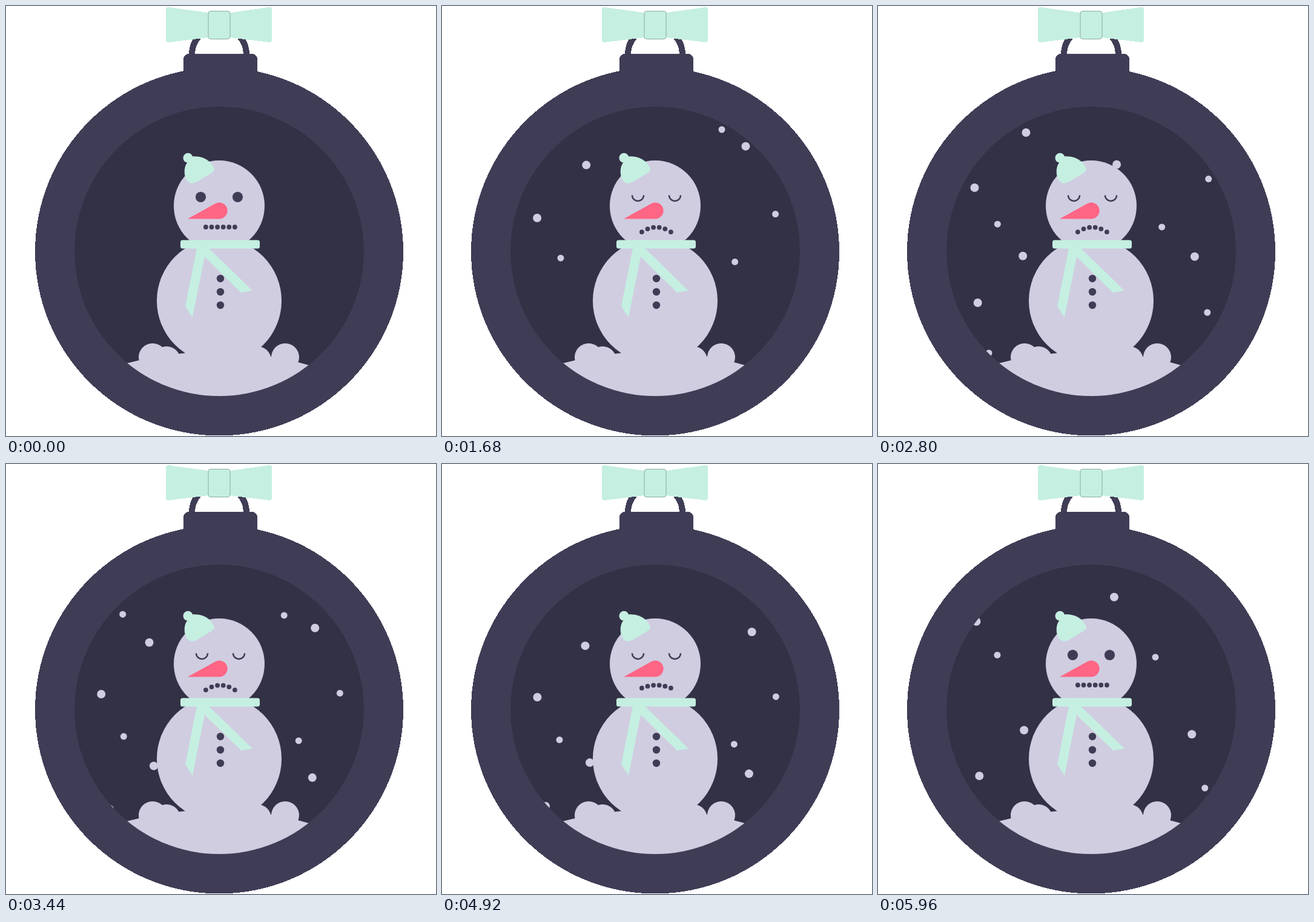
These frames come from a looping animation (710x710 px, 6000 ms). An HTML page:

```html
<!DOCTYPE html>
<html lang="en">
<head>
<meta charset="utf-8">
<title>Snowman bauble</title>
<style>
  html, body { margin: 0; width: 100%; height: 100%; overflow: hidden; background: #fff; }
  svg { display: block; width: 100vw; height: 100vh; }
  .shell { fill: #3f3d56; }
  .snow { fill: #d0cde1; }
  .mint { fill: #c5efe1; }
  .line { fill: none; stroke: #3f3d56; }
</style>
</head>
<body>
<svg viewBox="0 0 710 710">
  <defs>
    <clipPath id="window"><circle cx="352" cy="405" r="239"/></clipPath>
  </defs>

  <g shape-rendering="crispEdges">
    <circle class="line" cx="352" cy="80" r="45" stroke-width="10"/>
    <rect class="shell" x="293" y="79" width="122" height="60" rx="9"/>
    <circle class="shell" cx="352" cy="405.5" r="304"/>
    <g class="mint">
      <path d="M268 2 L334 11 V52 L268 60 Q264 60 264 56 V5 Q264 2 268 2Z"/>
      <path d="M435 2 L370 11 V52 L435 60 Q439 60 439 56 V5 Q439 2 435 2Z"/>
    </g>
  </g>
  <rect class="mint" x="334" y="8.5" width="36" height="46" rx="4" stroke="#86aca3"/>

  <g clip-path="url(#window)">
    <circle cx="352" cy="405" r="239" fill="#333146"/>
    <g id="flakes" class="snow"></g>
    <g class="snow">
      <path d="M195 591 Q352 549 507 595 V660 H195Z"/>
      <circle cx="242" cy="580" r="23"/>
      <circle cx="265" cy="585" r="23"/>
      <circle cx="415" cy="585" r="23"/>
      <circle cx="461" cy="580" r="23"/>
      <circle cx="352" cy="486.7" r="103"/>
      <circle cx="352" cy="330" r="75"/>
    </g>
  </g>

  <g class="mint">
    <circle cx="300.5" cy="250.8" r="8"/>
    <path d="M308 248.5 C326 247 340 257 344 269 Q344 273 339 276 L314 291 Q304 296 298 287 C293 278 294 265 299 259Z"/>
    <rect x="288" y="386.5" width="131" height="14" rx="3.5"/>
    <path d="M315 400 L296 496 L308 514 L328 414 L388 473 L407 470 L335 400Z"/>
  </g>

  <g id="buttons" class="shell"></g>
  <g id="open" class="shell">
    <circle cx="321.5" cy="315.3" r="8.6"/>
    <circle cx="382.5" cy="315.3" r="8.6"/>
  </g>
  <g id="closed" class="line" stroke-width="2.5">
    <path d="M314 312.5 a9.5 9.5 0 0 0 19 0"/>
    <path d="M375 312.5 a9.5 9.5 0 0 0 19 0"/>
  </g>
  <path fill="#ff6584" d="M300 351.5 L346 326 A13.5 13.5 0 1 1 353 351.5Z"/>
  <g id="mouth" class="shell"></g>
</svg>

<script>
  const LOOP = 6000, STEP = 40;
  const STARTS = [0, 1520, 2960, 5000];   // each snowfall begins here
  const FIRST = 160, GAP = 800;           // ages at which the sway points lie

  // r: radius, y: starting height, v: fall in px per ms, sway: x at every GAP
  const FLAKES = [
    { r: 7, y: 37.5, v: .134, sway: [262, 250, 237.5, 237.5, 244] },
    { r: 7, y: 94, v: .131, sway: [380, 390, 399, 399, 395] },
    { r: 7, y: 140, v: .125, sway: [172, 162.5, 157, 162, 171] },
    { r: 5.5, y: 181, v: .14, sway: [190, 197, 195.5, 187, 174] },
    { r: 5.5, y: 181, v: .1437, sway: [462, 458, 484.5, 464, 458] },
    { r: 5.5, y: 100, v: .145, sway: [525, 540.5, 551, 547.5, 534] },
    { r: 7, y: -41.5, v: .1626, sway: [445, 468, 504.5, 525, 508, 484] }
  ];

  const byId = id => document.getElementById(id);
  const clamp = (v, lo, hi) => Math.min(hi, Math.max(lo, v));
  const ease = u => { u = clamp(u, 0, 1); return u * u * (3 - 2 * u); };

  function addDot(id, r) {
    const dot = document.createElementNS("http://www.w3.org/2000/svg", "circle");
    dot.setAttribute("r", r);
    return byId(id).appendChild(dot);
  }

  function place(dot, x, y) {
    dot.setAttribute("cx", x.toFixed(2));
    dot.setAttribute("cy", y.toFixed(2));
  }

  // Smooth curve through evenly spaced values
  function spline(values, pos) {
    const last = values.length - 1;
    pos = clamp(pos, 0, last);
    const i = Math.min(Math.floor(pos), last - 1), u = pos - i, w = 1 - u;
    const at = j => values[clamp(j, 0, last)];
    const slope = j => (at(j + 1) - at(j - 1)) / 2;
    return at(i) + (at(i + 1) - at(i)) * ease(u) + u * w * (w * slope(i) - u * slope(i + 1));
  }

  const drops = STARTS.flatMap(start =>
    FLAKES.map(flake => ({ start, flake, dot: addDot("flakes", flake.r) })));
  const teeth = Array.from({ length: 6 }, (_, i) => addDot("mouth", 3.9));
  for (let i = 0; i < 3; i++) place(addDot("buttons", 6.2), 354, 450 + 22 * i);

  function draw(t) {
    for (const { start, flake, dot } of drops) {
      const age = t - start;
      dot.style.display = age < 0 ? "none" : "";
      place(dot, spline(flake.sway, (age - FIRST) / GAP), flake.y + flake.v * age);
    }

    const frown = ease((t - 480) / 320) - ease((t - 4800) / 280);
    teeth.forEach((dot, i) => {
      const k = i - 2.5;
      place(dot, 353.9 + k * 9.6, 365 + frown * (.3 + 1.25 * k * k));
    });

    const asleep = t >= 600 && t < 5000;
    byId("open").style.display = asleep ? "none" : "";
    byId("closed").style.display = asleep ? "" : "none";
  }

  const begin = performance.now();
  function tick() {
    const t = (performance.now() - begin) % LOOP;
    draw(Math.floor(t / STEP) * STEP);
    requestAnimationFrame(tick);
  }
  tick();
</script>
</body>
</html>
```
